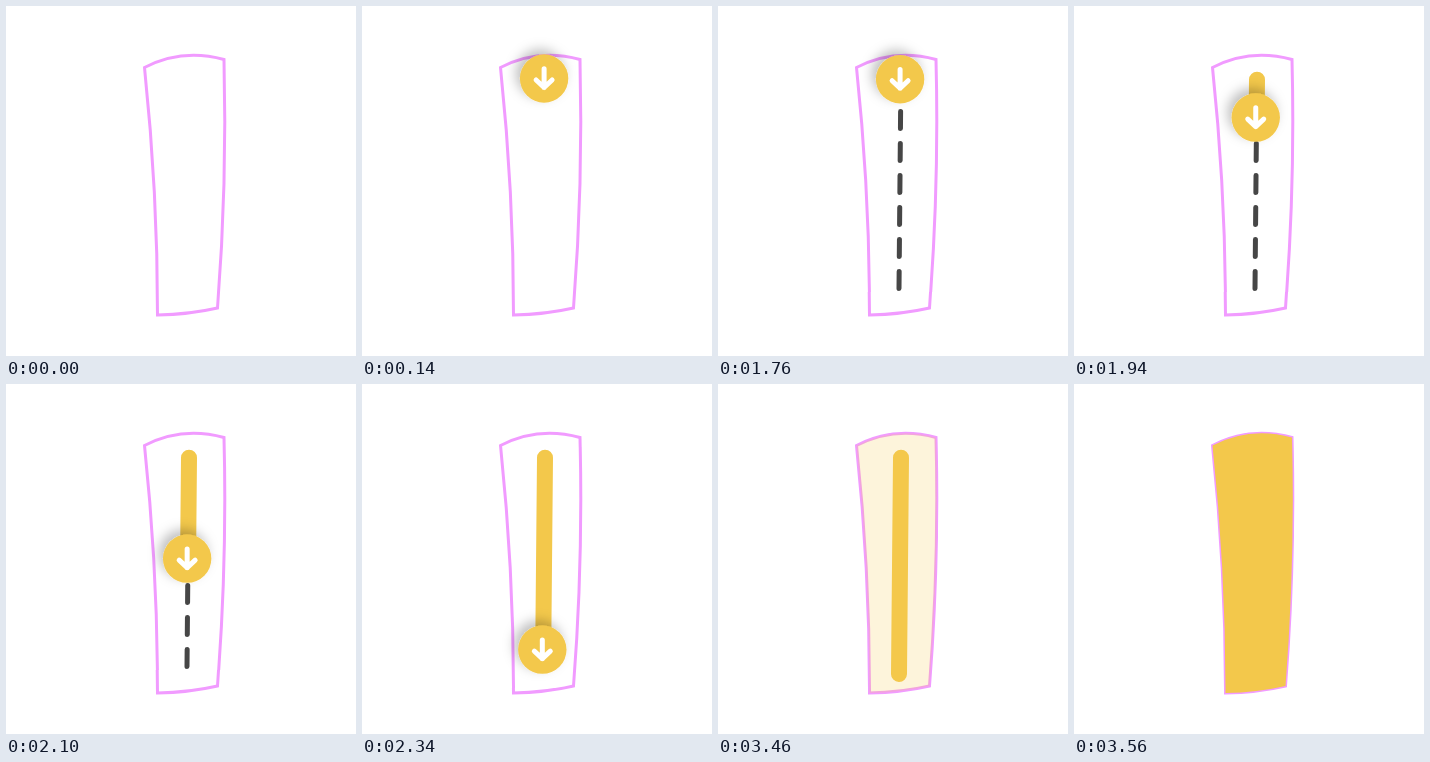
Animation, 350 px wide and 350 px high, one loop 4.8 s. Source, as an HTML page without scripts:

```html
<!DOCTYPE html>
<html lang="en">
<head>
<meta charset="utf-8">
<title>Stroke guide</title>
<style>
  html, body { margin: 0; width: 100%; height: 100%; overflow: hidden; background: #fff; }
  svg { display: block; width: 100%; height: 100%; }
  .outline { fill: none; stroke: #f19bff; stroke-width: 3; }
  .guide { stroke: #464646; stroke-width: 5; stroke-dasharray: 17 15; stroke-linecap: round; }
  .trail { stroke: #f3c84b; stroke-width: 16; stroke-linecap: round; }
  .gold { fill: #f3c84b; }
  .arrow { fill: none; stroke: #fff; stroke-width: 5; stroke-linecap: round; stroke-linejoin: round; }
</style>
</head>
<body>
<svg viewBox="0 0 350 350">
  <defs>
    <path id="shape" d="M138.5 61.5Q176 42 218 53.5Q221.2 178 211.5 302Q183 308.5 151.5 309Q151.7 187 138.5 61.5Z"/>
    <filter id="shadow" x="-60%" y="-60%" width="220%" height="220%">
      <feDropShadow dx="-4" dy="-5" stdDeviation="6" flood-color="#000" flood-opacity=".25"/>
    </filter>
  </defs>

  <use href="#shape" class="outline"/>

  <!-- dashed guide grows downwards -->
  <line class="guide" x1="182.6" y1="105.5" x2="181" y2="282.5" visibility="hidden">
    <animate attributeName="visibility" dur="4.8s" repeatCount="indefinite" calcMode="discrete"
      values="hidden;visible" keyTimes="0;.18917"/>
    <animate attributeName="x2" dur="4.8s" repeatCount="indefinite"
      values="182.6;182.6;181;181" keyTimes="0;.18917;.29583;1"/>
    <animate attributeName="y2" dur="4.8s" repeatCount="indefinite"
      values="105.5;105.5;282.5;282.5" keyTimes="0;.18917;.29583;1"/>
  </line>

  <!-- solid trail follows the badge -->
  <line class="trail" x1="183" y1="73.7" x2="181" y2="290" visibility="hidden">
    <animate attributeName="visibility" dur="4.8s" repeatCount="indefinite" calcMode="discrete"
      values="hidden;visible" keyTimes="0;.36146"/>
    <animate attributeName="x2" dur="4.8s" repeatCount="indefinite" calcMode="spline"
      values="183;183;181;181" keyTimes="0;.36146;.51979;1"
      keySplines="0 0 1 1;.333 0 .667 1;0 0 1 1"/>
    <animate attributeName="y2" dur="4.8s" repeatCount="indefinite" calcMode="spline"
      values="73.7;73.7;290;290" keyTimes="0;.36146;.51979;1"
      keySplines="0 0 1 1;.333 0 .667 1;0 0 1 1"/>
  </line>

  <!-- arrow badge -->
  <g opacity="0">
    <animate attributeName="opacity" dur="4.8s" repeatCount="indefinite"
      values="0;0;1;1;0;0" keyTimes="0;.00417;.02917;.60417;.6375;1"/>
    <animateTransform attributeName="transform" type="translate" dur="4.8s" repeatCount="indefinite" calcMode="spline"
      values="182.1 72.5;182.1 72.5;180.1 288.7;180.1 288.7" keyTimes="0;.36146;.51979;1"
      keySplines="0 0 1 1;.333 0 .667 1;0 0 1 1"/>
    <circle class="gold" r="24.2" filter="url(#shadow)"/>
    <path class="arrow" d="M0-9.7V9M-8 1.5L0 9L8 1.5"/>
  </g>

  <!-- finished stroke -->
  <use href="#shape" class="gold" opacity="0">
    <animate attributeName="opacity" dur="4.8s" repeatCount="indefinite"
      values="0;0;1;1" keyTimes="0;.71583;.74167;1"/>
  </use>
</svg>
</body>
</html>
```
